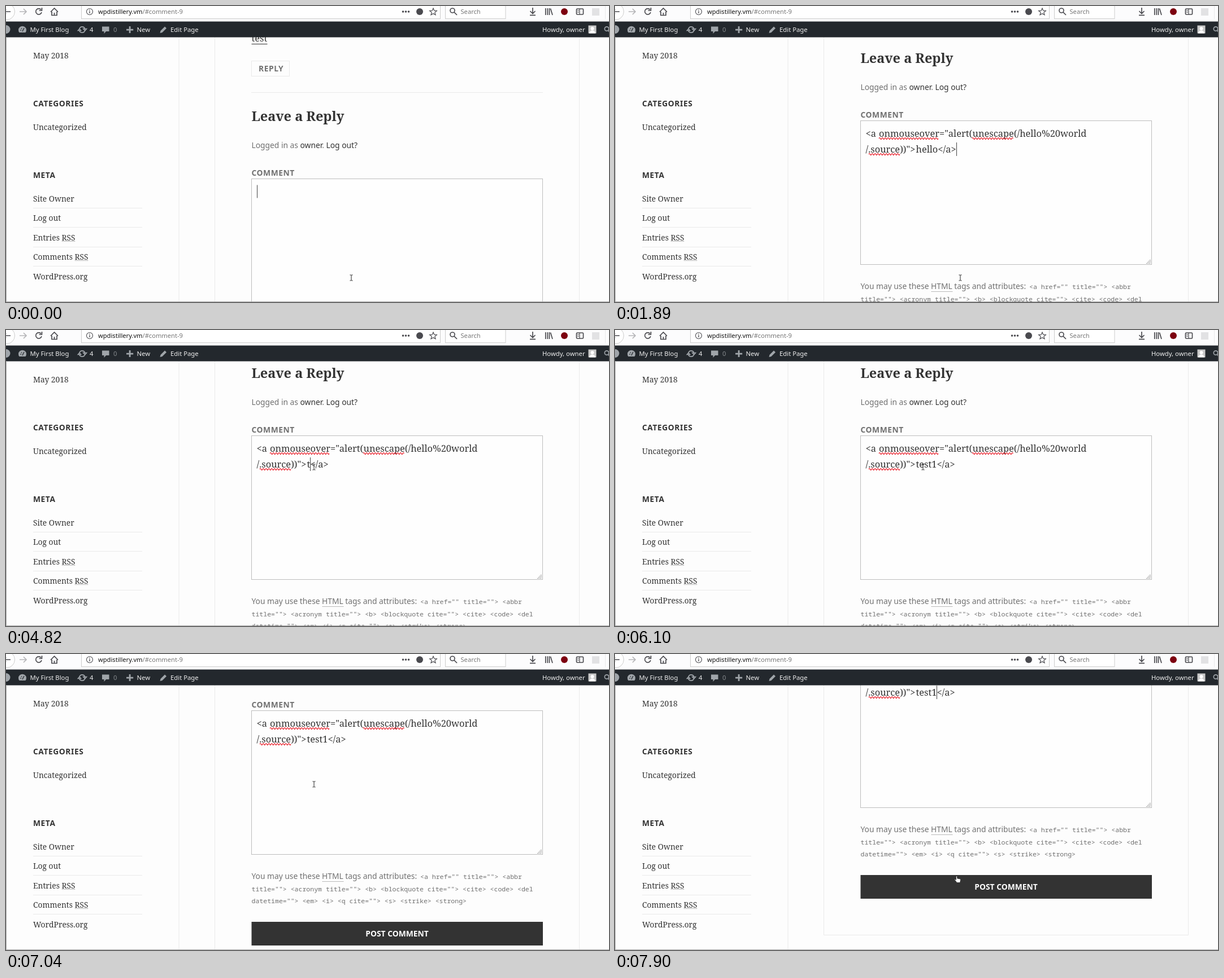
Animation, 1067 px wide and 525 px high, one loop 8000 ms. Source, as an HTML page:

```html
<!DOCTYPE html>
<html lang="en">
<head>
<meta charset="utf-8">
<title>Comment form</title>
<style>
html, body { margin: 0; width: 100%; height: 100%; overflow: hidden; background: #fdfdfd; }
svg { display: block; }
text { white-space: pre; fill: #333; }
.serif { font: 13.8px "Noto Serif", serif; }
.sans { font: 13.8px "Noto Sans", sans-serif; }
.caps { font: bold 13.8px "Noto Sans", sans-serif; letter-spacing: .04em; }
.title { font: bold 23.5px "Noto Serif", serif; }
.input { font: 16.4px "Noto Serif", serif; }
.code { font: 11.54px "Noto Sans Mono", monospace; }
.ui { font: 11.15px "Noto Sans", sans-serif; }
.bar text { font: 11.3px "Noto Sans", sans-serif; fill: #eee; }
.soft { fill: #707070; }
.rule { stroke: #eaeaea; fill: none; }
.abbr { stroke: #777; stroke-dasharray: 1 1; }
.icon { fill: none; stroke: #4a4a4f; stroke-width: 1.7; }
.box { fill: #fff; stroke: #ccc; }
</style>
</head>
<body>
<svg width="1067" height="525" viewBox="0 0 1067 525">
  <rect width="1067" height="525" fill="#fdfdfd"/>
  <path class="rule" d="M306 55V525"/>

  <!-- Sidebar -->
  <g class="serif">
    <text x="48" y="93">May 2018</text>
    <text x="48" y="220">Uncategorized</text>
    <text x="48" y="347">Site Owner</text>
    <text x="48" y="381">Log out</text>
    <text x="48" y="416">Entries RSS</text>
    <text x="48" y="450">Comments RSS</text>
    <text x="48" y="485">WordPress.org</text>
  </g>
  <text class="caps" x="48" y="178">CATEGORIES</text>
  <text class="caps" x="48" y="305">META</text>
  <path class="rule" d="M48 358.5H241M48 392.5H241M48 427.5H241M48 461.5H241"/>
  <path class="abbr" d="M99 417.5h24M122 451.5h24"/>

  <!-- Scrolling post -->
  <g id="page">
    <path class="rule" d="M369.5-50V787.5H1014.5V-50M434 153.5H950"/>
    <text class="input" x="434.5" y="63">test</text>
    <path d="M434.5 67.5h28" stroke="#333"/>
    <rect class="rule" x="434.5" y="97.5" width="67" height="27"/>
    <text class="caps soft" x="447" y="116">REPLY</text>
    <text class="title" x="434.5" y="204">Leave a Reply</text>
    <text class="sans soft" x="434.5" y="252">Logged in as <tspan fill="#333">owner</tspan>. <tspan fill="#333">Log out?</tspan></text>
    <text class="caps soft" x="434.5" y="300.5">COMMENT</text>
    <rect x="434.5" y="306.5" width="515" height="255" fill="#fefefe" stroke="#bdbdbd"/>
    <path d="M940 559.5h8M942 557.5h6M944 555.5h4M946 553.5h2" stroke="#888" stroke-dasharray="1.5 1"/>
    <g id="markup" class="input">
      <text x="443.5" y="335">&lt;a <tspan x="467">onmouseover="alert(</tspan><tspan x="632.5">unescape(/hello%20world</tspan></text>
      <text x="443.5" y="363">/.source))"&gt;</text>
      <rect id="selection" x="532.5" y="345" height="23" fill="#0078d7"/>
      <text id="ending" x="532.5" y="363"><tspan id="word">hello</tspan>&lt;/a&gt;</text>
    </g>
    <path id="waves" fill="none" stroke="#e8101c" stroke-width="1.2"/>
    <rect id="caret" width="1" fill="#444"/>
    <text class="sans soft" x="434.5" y="605">You may use these HTML tags and attributes:</text>
    <path class="abbr" d="M560 609.5h38"/>
    <g class="code">
      <text class="soft" x="733" y="605">&lt;a href="" title=""&gt; &lt;abbr</text>
      <text class="soft" x="434.5" y="627">title=""&gt; &lt;acronym title=""&gt; &lt;b&gt; &lt;blockquote cite=""&gt; &lt;cite&gt; &lt;code&gt; &lt;del</text>
      <text class="soft" x="434.5" y="648">datetime=""&gt; &lt;em&gt; &lt;i&gt; &lt;q cite=""&gt; &lt;s&gt; &lt;strike&gt; &lt;strong&gt;</text>
    </g>
    <rect x="434.5" y="681" width="515.5" height="42" fill="#333"/>
    <text class="caps" x="692" y="707" text-anchor="middle" style="fill:#fff;letter-spacing:0">POST COMMENT</text>
  </g>

  <!-- Browser toolbar -->
  <rect width="1067" height="28" fill="#fcfcfd"/>
  <circle class="box" cx="1" cy="10" r="14.5"/>
  <g class="icon">
    <path d="M0 10H8M0 6L-3 10L0 14"/>
    <path d="M24 10H36M31 5L36 10L31 15" stroke="#b5b5b8"/>
    <path d="M62 6.5A5.2 5.2 0 1 0 63 11M63.5 3V8H58.5"/>
    <path d="M79 10.5L85.5 4L92 10.5M81 10V16.5H90V10M85.5 16V12"/>
  </g>
  <rect class="box" x="133.5" y="-5" width="635" height="27.5"/>
  <rect class="box" x="777.5" y="-5" width="106.5" height="27.5"/>
  <g class="icon">
    <circle cx="148" cy="10" r="5.5" stroke-width="1.1"/>
    <path d="M148 9V13M148 6.5V8" stroke-width="1.3"/>
    <path d="M756 4L757.8 8.2L762.3 8.5L758.8 11.4L760 15.8L756 13.4L752 15.8L753.2 11.4L749.7 8.5L754.2 8.2Z" stroke-width="1.2"/>
    <circle cx="790" cy="8" r="4"/>
    <path d="M793 11L798 16"/>
    <path d="M932 3V13M927.5 9L932 13.5L936.5 9M927 16.3H937"/>
    <path d="M954.8 4V16M958.3 4V16M961.5 4V16M963.5 4.5L967 16"/>
    <rect x="1009.5" y="5" width="12" height="10" rx="1.5"/>
    <path d="M1015 5V15M1011 8H1014M1011 11H1014" stroke-width="1.2"/>
  </g>
  <g fill="#4a4a4f">
    <circle cx="702.5" cy="10" r="1.8"/><circle cx="707.5" cy="10" r="1.8"/><circle cx="712.5" cy="10" r="1.8"/>
    <circle cx="732" cy="10" r="6"/>
  </g>
  <circle cx="988" cy="10" r="6" fill="#7d0010"/>
  <rect x="1037" y="4" width="13" height="13" fill="#e2e2e4"/>
  <path class="rule" d="M1060.5 0V23"/>
  <text class="ui" x="163" y="14" style="fill:#111">wpdistillery.vm<tspan fill="#777">/#comment-9</tspan></text>
  <text class="ui" x="804.5" y="14" style="fill:#777">Search</text>

  <!-- Dark site bar -->
  <g class="bar">
    <rect y="27.5" width="1067" height="28" fill="#23282d"/>
    <g fill="#a0a5aa">
      <circle cx="0" cy="41.5" r="7.5"/>
      <path d="M23.5 47A7 7 0 1 1 34.5 47Z"/>
      <path d="M170 36.5h12.5v8.5h-5.5l-3.5 4v-4h-3.5z"/>
      <path d="M217.7 36h2.8v4.7h4.7v2.7h-4.7v4.7h-2.8v-4.7h-4.7v-2.7h4.7z"/>
      <path d="M272.5 48l1-4 7.5-7.5 3 3-7.5 7.5z"/>
    </g>
    <path d="M29 45L32 39M25.5 43h1.5M27 39.5l1 1" stroke="#23282d" stroke-width="1.3"/>
    <path d="M130 40.5A5 5 0 0 1 139.5 40M139.5 43.5A5 5 0 0 1 130 44M137 40.5h5.5l-2.5 3zM127.5 43.5h5l-2.5-3z" fill="none" stroke="#a0a5aa" stroke-width="1.7"/>
    <text x="42.5" y="46">My First Blog</text>
    <text x="148" y="46">4</text>
    <text x="190" y="46" style="fill:#85898d">0</text>
    <text x="231.5" y="46">New</text>
    <text x="291" y="46">Edit Page</text>
    <text x="949" y="46">Howdy, owner</text>
    <rect x="1030.5" y="34.5" width="14" height="14" fill="#c9c9c9"/>
    <path d="M1032 48.5a5.5 5 0 0 1 11 0z" fill="#fff"/>
    <circle cx="1037.5" cy="40" r="3" fill="#fff"/>
    <path d="M1066 44l4 4" stroke="#a0a5aa" stroke-width="2"/>
    <circle cx="1063" cy="40.5" r="3.7" fill="none" stroke="#a0a5aa" stroke-width="1.7"/>
  </g>
  <path d="M.5 55V525M0 524.5H1067" stroke="#aaa"/>

  <!-- Pointers -->
  <path id="beam" d="M-2.5-5h2l.5.5.5-.5h2M0-4.5v9M-2.5 5h2l.5-.5.5.5h2" fill="none" stroke="#222"/>
  <path id="hand" d="M-2.5-5.5q1.2-1 2 0v3.5l5 1q1.5.5 1 2l-1 4.5h-5.5l-4-5q0-1.5 2.5 0z" fill="#fff" stroke="#222" stroke-width=".7"/>
</svg>
<script>
const $ = id => document.getElementById(id);
const LOOP = 8000, WORD_X = 532.5;

// Each track holds [start ms, value...]; values change in hard steps.
const scroll = [[0, 0], [140, 6], [1770, 45], [1890, 103], [2040, 116], [2170, 119],
  [6500, 120], [6620, 121], [6760, 123], [7040, 206], [7190, 248], [7320, 289]];
const pointer = [[0, 611, 482], [2040, 604, 430], [2170, 592, 349], [2320, 570, 315],
  [2440, 558, 292], [2560, 554, 279], [2830, 551, 270], [2950, 548, 261], [3100, 546, 250],
  [3220, 545, 243], [6500, 545, 236], [6620, 545, 231], [7620, 565, 275], [7750, 598, 339], [7900, 606, 400]];
const typed = [[0, "hello"], [4820, "t"], [4950, "te"], [5100, "tes"], [5240, "test"], [5800, "test1"]];
// Caret position counted in characters from the link text; -1 is hidden.
const caretAt = [[0, 0], [390, -1], [820, 9], [940, -1], [1470, 9], [2040, -1], [2560, 9],
  [2950, -1], [3500, 9], [3620, 1], [3770, -1], [4820, 1], [4950, 2], [5100, 3], [5240, 4],
  [5650, -1], [5800, 5], [6100, -1], [6620, 5], [7040, -1], [7620, 5]];

const at = (track, t) => track.findLast(step => step[0] <= t).slice(1);
const show = (el, on) => el.setAttribute("visibility", on ? "visible" : "hidden");
const move = (el, x, y) => el.setAttribute("transform", `translate(${x} ${y})`);
const wave = (x, y, end) => `M${x} ${y}q1.25-3 2.5 0` + "t2.5 0".repeat((end - x) / 2.5 - 1);

$("waves").setAttribute("d", wave(467, 338, 574) + wave(632, 338, 706) + wave(449, 366, 505));

function draw(t) {
  const [word] = at(typed, t), [chars] = at(caretAt, t), [x, y] = at(pointer, t);
  const pasted = t >= 820, selected = t >= 3770 && t < 4820, overButton = t >= 7900;

  move($("page"), 0, -at(scroll, t)[0]);
  if ($("word").textContent !== word) $("word").textContent = word;
  $("word").style.fill = selected ? "#fff" : "#333";
  show($("markup"), pasted);
  show($("waves"), t >= 940);
  show($("selection"), selected);
  if (selected) $("selection").setAttribute("width", $("word").getComputedTextLength());

  const caret = $("caret");
  show(caret, chars >= 0);
  const offset = chars > 0 ? $("ending").getSubStringLength(0, chars) : 0;
  caret.setAttribute("x", pasted ? Math.round(WORD_X + offset) : 444);
  caret.setAttribute("y", pasted ? 345 : 317.5);
  caret.setAttribute("height", pasted ? 24 : 23);

  show($("beam"), !overButton);
  show($("hand"), overButton);
  move($("beam"), x, y);
  move($("hand"), x, y);
}

function frame() {
  draw(performance.now() % LOOP);
  requestAnimationFrame(frame);
}
frame();
</script>
</body>
</html>
```
